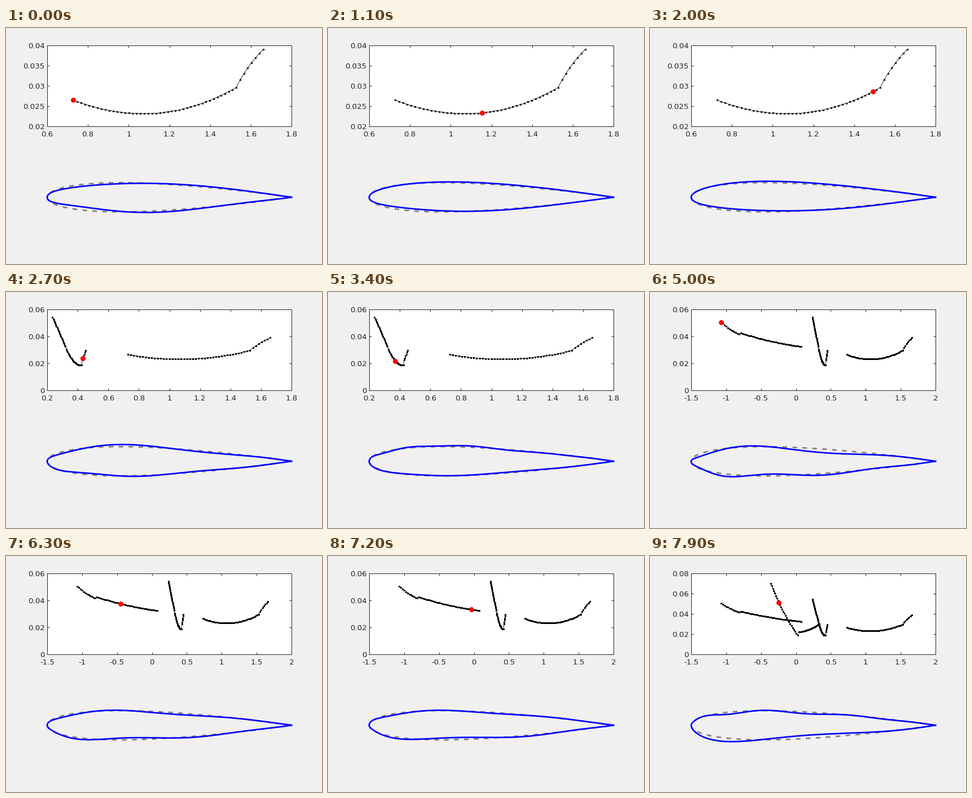
A matplotlib script for the animation above (8000 ms loop, 560x420 px).

```python
import numpy as np
import matplotlib.pyplot as plt
from matplotlib.animation import FuncAnimation

W, H, DPI = 560, 420, 100
POINTS, PER_SWEEP, FRAMES = 50, 25, 80
CHORD, LEFT = 433, 73
INK = "#262626"

plt.rcParams["font.family"] = "DejaVu Sans"


def px(n):
    """Pixels to points."""
    return n * 72 / DPI


def branch(n, start, end, bend=(0, 0)):
    """n points along a parabola; bend is its offset halfway."""
    t = np.linspace(0, 1, n)
    return np.array([a + (b - a) * t + 4 * c * t * (1 - t)
                     for a, b, c in zip(start, end, bend)])


# Every sweep has 50 points on branches that meet at a kink or jump.
curves = [np.hstack(parts) for parts in (
    (branch(43, (.7275, .0265), (1.528, .0296), (.007, -.0048)),
     branch(7, (1.547, .0315), (1.661, .039), (0, .0005))),
    (branch(6, (.4513, .0296), (.4291, .0225)),
     branch(23, (.4254, .0188), (.3256, .0304), (0, -.0033)),
     branch(21, (.320, .0323), (.2351, .0542))),
    (branch(12, (-1.0676, .0506), (-.813, .0417), (0, -.001)),
     branch(38, (-.789, .0425), (.076, .0325), (.012, -.0012))),
    (branch(25, (-.358, .07), (.024, .0189), (-.014, -.002)),
     branch(25, (.044, .0222), (.333, .03), (0, -.0016))),
)]

# x and y tick ranges (first, last, count) as the sweeps are added
STAGES = [((.6, 1.8, 7), (.02, .04, 5)),
          ((.2, 1.8, 9), (0, .06, 4)),
          ((-1.5, 2, 8), (0, .06, 4)),
          ((-1.5, 2, 8), (0, .08, 5))]

theta = np.linspace(0, np.pi, 121)
s = (1 - np.cos(theta)) / 2
half = CHORD * .6 * (.2969 * np.sqrt(s) - .126 * s - .3516 * s**2
                     + .2843 * s**3 - .1036 * s**4)


def wave(bias, amp, freq, crest):
    """Outward bulge of one surface in pixels, fading to both edges."""
    envelope = np.sin(theta) * (1 + np.cos(theta))
    return envelope * (bias + amp * np.cos(freq * (theta - crest)))


def shape(upper, lower):
    return np.array([wave(*upper), wave(*lower)])


late = shape((-1.3, 1.8, 8.5, 1.17), (.2, 6.5, 2.6, .5))

# Two key shapes per sweep: (point index, shape)
MORPHS = [
    ((0, shape((0, 3, 2, 2.2), (-1.3, 4, 3.2, 1.6))),
     (22, shape((.2, 2.2, 1.3, 2.1), (-.9, 2.5, 2.6, 1.85)))),
    ((4, shape((-.3, 3.3, 3.8, 1.2), (-.5, 1.6, 6, 1.35))),
     (32, shape((.4, 1.6, 10, 1.43), (.2, 2.2, 2, .2)))),
    ((0, shape((-3.2, 4.5, 4, 1), (.5, 3, 6.5, .75))),
     (26, shape((-1.2, 1.9, 5, 1.07), (-.2, 2.7, 5.3, .68)))),
    ((0, late * 1.3), (8, late)),
]


def outline(upper, lower):
    """Closed path, trailing edge over the top and back underneath."""
    return np.r_[s[::-1], s[1:]], np.r_[upper[::-1], -lower[1:]]


def foil(k, i):
    (i0, a), (i1, b) = MORPHS[k]
    t = (i - i0) / (i1 - i0)
    if t > 1:
        t = 1 + .4 * np.tanh((t - 1) / .4)
    return outline(*(half + a + (b - a) * t))


fig = plt.figure(figsize=(W / DPI, H / DPI), dpi=DPI, facecolor="#f0f0f0")


def pixel_axes(top, height):
    return fig.add_axes([LEFT / W, 1 - (top + height) / H,
                         CHORD / W, height / H])


ax = pixel_axes(31, 144)
ax.tick_params(direction="in", top=True, right=True, length=px(4.3),
               width=px(1), color=INK, labelcolor=INK, labelsize=px(13.33))
ax.tick_params(axis="x", pad=px(7.5))
ax.tick_params(axis="y", pad=px(4.5))
for side in ax.spines.values():
    side.set(color=INK, linewidth=px(1))

lines = [ax.plot([], [], "k-s", lw=px(.8), ms=px(3), mew=0)[0]
         for _ in curves]
dot, = ax.plot([], [], "o", color="red", ms=px(9), mew=0, zorder=5)

wing = pixel_axes(251.2, 100)
wing.set(xlim=(0, 1), ylim=(-50, 50))
wing.axis("off")
wing.plot(*outline(half, half), color="#808080", lw=px(2.67),
          dashes=(3.1, 3.5), dash_capstyle="butt", clip_on=False)
skin, = wing.plot([], [], color="blue", lw=px(2.67), clip_on=False)


def draw(frame):
    k, step = divmod(frame, PER_SWEEP)
    i = step * POINTS // PER_SWEEP
    for axis, ticks in zip("xy", STAGES[k]):
        at = np.linspace(*ticks).round(6)
        ax.set(**{f"{axis}ticks": at, f"{axis}lim": ticks[:2],
                  f"{axis}ticklabels": [f"{v:g}" for v in at]})
    for j, (line, curve) in enumerate(zip(lines, curves)):
        line.set_data(*(curve if j <= k else ([], [])))
    dot.set_data(*curves[k][:, i:i + 1])
    skin.set_data(*foil(k, i))
    return [*lines, dot, skin]


anim = FuncAnimation(fig, draw, frames=FRAMES, interval=100,
                     repeat=True, repeat_delay=0)
plt.show()
```
